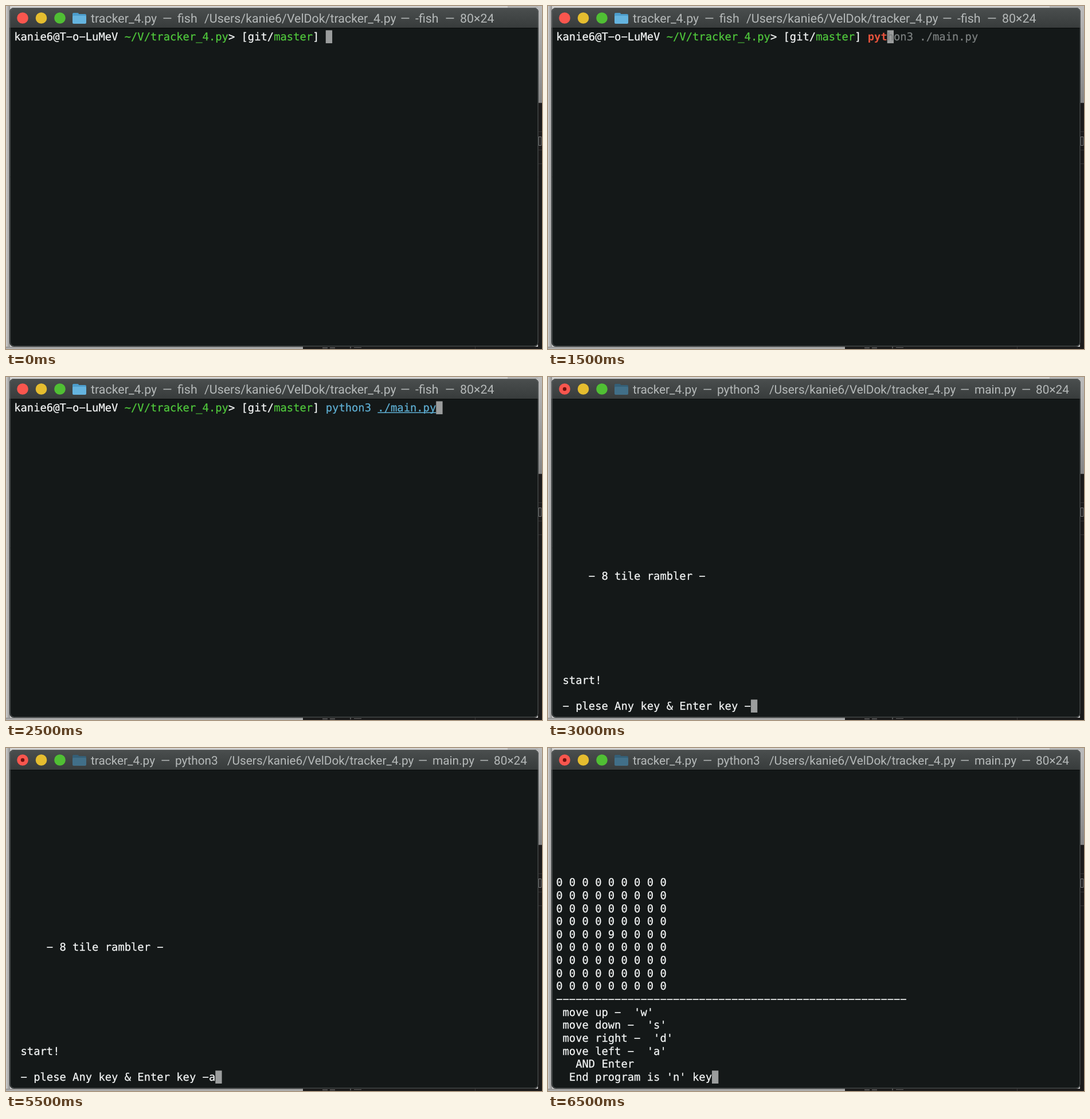
An HTML page with a canvas that plays this animation: 935x599 px, repeating every 7000 ms.

```html
<!DOCTYPE html>
<html lang="en">
<head>
<meta charset="utf-8">
<title>Terminal</title>
<style>
  html, body { margin: 0; width: 100%; height: 100%; overflow: hidden; background: #141818; }
  canvas { display: block; }
</style>
</head>
<body>
<canvas id="stage" width="935" height="599"></canvas>
<script>
const ctx = document.getElementById('stage').getContext('2d');
const LOOP = 7000;
const CELL = 11.324, LINE = 22.65, LEFT = 14.2, BASE = 60;
const WHITE = '#f4f6f6', GREEN = '#50c83c', GREY = '#7c8080',
      BLUE = '#5eaed2', RED = '#e4523c', CURSOR = '#9b9d9d';
const FILE = 'tracker_4.py', USER = 'kanie6', FOLDER = 'VelDok';
const PATH = `/Users/${USER}/${FOLDER}/${FILE}`;
const COMMAND = 'python3 ./main.py', PROMPT_END = 48;

const SHELL_TITLE = {
  size: 21.4,
  words: [[FILE, 148], ['—', 273], ['fish', 299], [PATH, 346], ['—', 688],
          ['-fish', 714], ['—', 766], ['80×24', 792]]
};
const GAME_TITLE = {
  size: 20.8,
  words: [[FILE, 148], ['—', 270], ['python3', 295], [PATH, 386], ['—', 719],
          ['main.py', 744], ['—', 826], ['80×24', 851]]
};

function rect(x, y, w, h, color) {
  ctx.fillStyle = color;
  ctx.fillRect(x, y, w, h);
}

function gradient(x0, y0, x1, y1, from, to) {
  const g = ctx.createLinearGradient(x0, y0, x1, y1);
  g.addColorStop(0, from);
  g.addColorStop(1, to);
  return g;
}

function disc(x, y, r, color) {
  ctx.fillStyle = color;
  ctx.beginPath();
  ctx.arc(x, y, r, 0, 2 * Math.PI);
  ctx.fill();
}

// Writes text on the character grid and returns the next free column.
function write(row, col, text, color = WHITE, bold = false) {
  ctx.font = `${bold ? 'bold ' : ''}18.81px "DejaVu Sans Mono", monospace`;
  ctx.fillStyle = ctx.strokeStyle = color;
  ctx.lineWidth = 0.25;
  const y = BASE + row * LINE;
  for (const char of text.replace(/-/g, '−')) {
    const x = LEFT + col++ * CELL;
    ctx.fillText(char, x, y);
    if (!bold) ctx.strokeText(char, x, y);
  }
  return col;
}

function cursor(row, col) {
  rect(LEFT + col * CELL, 42.4 + row * LINE, CELL, LINE, CURSOR);
}

function drawDesktop() {
  rect(0, 0, 935, 599, '#d2d2d2');
  rect(0, 0, 7, 599, gradient(0, 0, 7, 0, '#d0d0d0', '#8e8e8e'));
  rect(875, 0, 60, 4, '#b5b5b5');
  rect(928, 0, 7, 169, gradient(0, 0, 0, 169, '#bcbcbc', '#858585'));
  rect(928, 169, 7, 430, '#1b1a1a');
  for (const y of [169, 219, 251, 275]) rect(929, y, 6, 1, '#353333');
  ctx.strokeStyle = '#777';
  ctx.lineWidth = 1;
  ctx.strokeRect(929.5, 228.5, 4, 15);
  rect(0, 595, 518, 4, gradient(0, 595, 0, 599, '#8d8d8d', '#b9b9b9'));
  rect(518, 595, 417, 4, '#1b1a1a');
  rect(818, 595, 1, 4, '#383636');
  rect(552, 596, 9, 2, '#555');
  rect(565, 596, 9, 2, '#555');
  rect(600, 595, 2, 3, '#555');
  rect(607, 596, 13, 1, '#666');
}

function drawFolder(active) {
  ctx.fillStyle = active ? '#4c9dcc' : '#345f77';
  ctx.beginPath();
  ctx.roundRect(116, 12, 11, 8, 2);
  ctx.roundRect(116, 14, 24, 8, 2);
  ctx.fill();
  ctx.fillStyle = active ? '#65b4df' : '#416f88';
  ctx.beginPath();
  ctx.roundRect(116, 17, 24, 14, 2);
  ctx.fill();
}

function drawWindow(running) {
  ctx.save();
  ctx.beginPath();
  ctx.roundRect(6, 3, 923, 592, 8);
  ctx.clip();
  rect(6, 3, 923, 592, '#141818');
  rect(6, 3, 923, 35, gradient(0, 3, 0, 38, '#4a4e4e', '#383c3c'));
  rect(6, 38, 923, 1, '#080a0a');
  ctx.restore();

  ctx.strokeStyle = '#5b5f5f';
  ctx.lineWidth = 1;
  ctx.beginPath();
  ctx.roundRect(7.5, 3.5, 920.5, 590.5, 7);
  ctx.stroke();

  ['#f9564e', '#e5bd2f', '#50bf34'].forEach((color, i) => disc(29 + i * 32.5, 21, 9.8, color));
  if (running) disc(29, 21, 3.2, '#6e120f');
  drawFolder(!running);

  const title = running ? GAME_TITLE : SHELL_TITLE;
  ctx.font = `${title.size}px Roboto, sans-serif`;
  ctx.fillStyle = '#b5b9b9';
  for (const [word, x] of title.words) ctx.fillText(word, x, 29);
}

function drawShell(t) {
  let col = write(0, 0, USER + '@T-o-LuMeV ');
  col = write(0, col, `~/${FOLDER[0]}/${FILE}`, GREEN);
  col = write(0, col, '> [git/');
  col = write(0, col, 'master', GREEN);
  write(0, col, ']');

  if (t >= 2500) {
    write(0, PROMPT_END, COMMAND, BLUE);
    rect(LEFT + 56 * CELL, 61.5, 9 * CELL, 1.5, BLUE);
    cursor(0, PROMPT_END + COMMAND.length);
    return;
  }
  // Two keys per half second, the rest of the command is suggested.
  const typed = t < 1000 ? 0 : 2 * Math.floor(t / 500) - 3;
  const caret = PROMPT_END + typed;
  cursor(0, caret);
  if (!typed) return;
  write(0, PROMPT_END, COMMAND.slice(0, typed), RED, true);
  write(0, caret, COMMAND.slice(typed), GREY);
}

function drawIntro(t) {
  write(13, 5, '- 8 tile rambler -');
  write(21, 1, 'start!');
  const answer = t < 4500 ? '' : 'a';
  cursor(23, write(23, 1, '- plese Any key & Enter key -' + answer));
}

function drawBoard() {
  for (let row = 0; row < 9; row++)
    for (let col = 0; col < 9; col++)
      write(8 + row, 2 * col, row === 4 && col === 4 ? '9' : '0');
  write(17, 0, '-'.repeat(54));
  const help = [" move up -  'w'", " move down -  's'", " move right -  'd'",
                " move left -  'a'", '   AND Enter', "  End program is 'n' key"];
  help.forEach((line, i) => write(18 + i, 0, line));
  cursor(23, help[5].length);
}

function draw(now) {
  const t = now % LOOP;
  ctx.textRendering = 'geometricPrecision';
  drawDesktop();
  drawWindow(t >= 3000);
  if (t < 3000) drawShell(t);
  else if (t < 6000) drawIntro(t);
  else drawBoard();
}

const start = performance.now();
function tick() {
  draw(performance.now() - start);
  requestAnimationFrame(tick);
}
tick();
</script>
</body>
</html>
```
